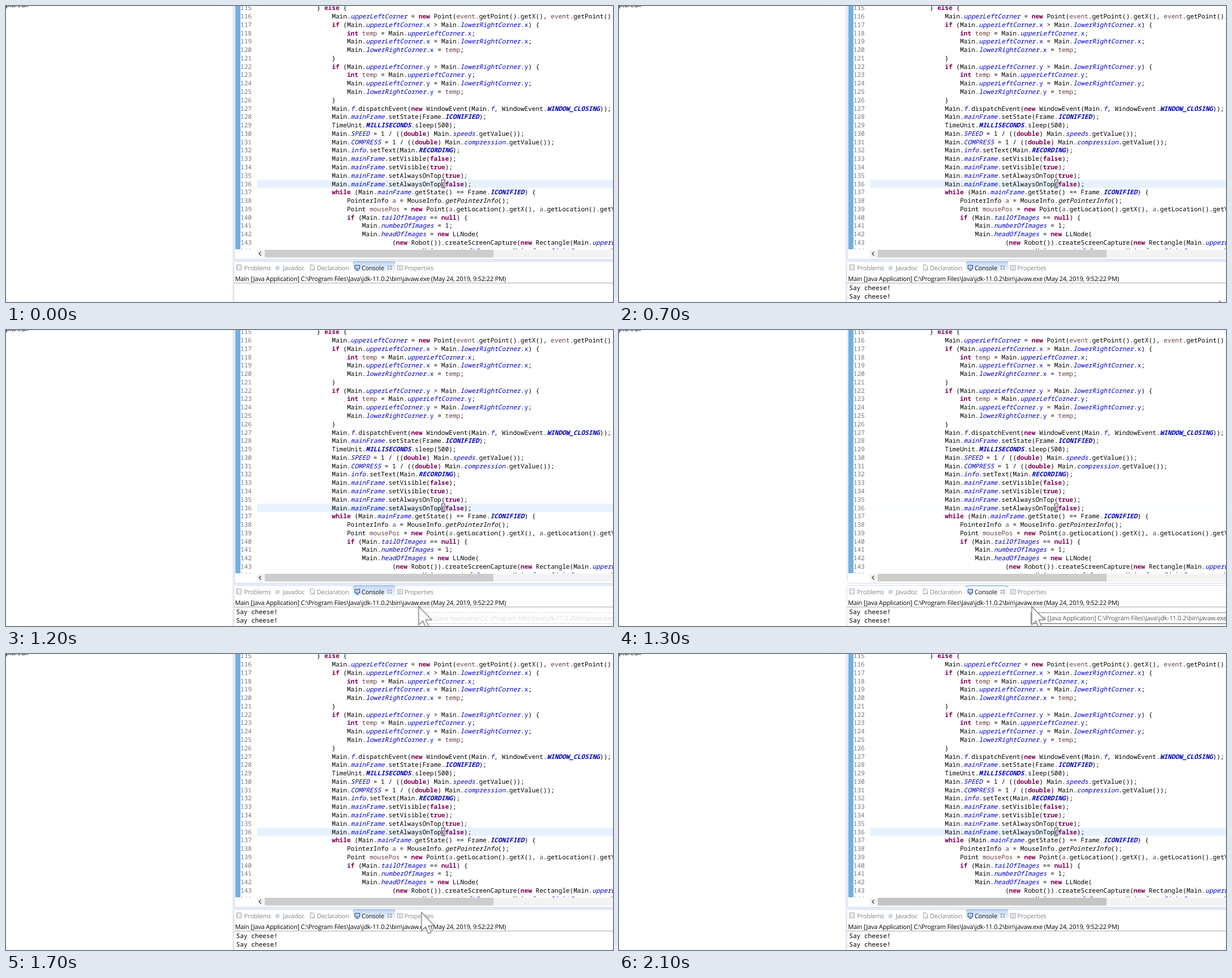
Animation, 1072 px wide and 522 px high, one loop 2.8 s. Source, as an HTML page:

```html
<!DOCTYPE html>
<html lang="en">
<meta charset="utf-8">
<title>Code editor and console</title>
<style>
  html, body { margin: 0; width: 100%; height: 100%; overflow: hidden; background: #fff }
  svg { display: block; text-rendering: geometricPrecision }
  text { white-space: pre }
  .mono { font: 11.117px "Noto Sans Mono", monospace }
  .ui { font: 11px "Open Sans", sans-serif; letter-spacing: -.18px }
  .num { fill: #787878 }
  .key { fill: #7f0055; font-weight: bold }
  .const { fill: #0000c0; font-weight: bold; font-style: italic }
  .static { fill: #0000c0; font-style: italic }
  .field { fill: #0000c0 }
  .local { fill: #6a3e3e }
  .call { font-style: italic }
  .tab { fill: #858585 }
</style>
<svg width="1072" height="522" viewBox="0 0 1072 522">
  <defs>
    <pattern id="hatch" width="2" height="2" patternUnits="userSpaceOnUse">
      <path fill="#a9cff0" d="M0 0h2v2H0z"/><path fill="#3d8fd6" d="M0 0h1v1H0zM1 1h1v1H1z"/>
    </pattern>
    <linearGradient id="tabFill" x2="0" y2="1">
      <stop stop-color="#c3d8f6"/><stop offset="1" stop-color="#fafcff"/>
    </linearGradient>
  </defs>
  <text class="ui" x="-1" y="1.5">ptureGif</text>

  <g id="tint">
    <path fill="#e6ebf8" d="M400 0h4v446H400zM400 446h672v4H400zM400 450h2v72h-2z"/>
    <path fill="#e8f2fe" d="M443 306.5h629V321H443z"/>
    <path fill="url(#tabFill)" d="M610 470q4-2 3-12 0-7 6-7h62q6 0 6 8 0 9 4 11z"/>
  </g>
  <path fill="#fff" d="M404 429h668v17H409q-5 0-5-5z"/>
  <path fill="none" stroke="#d3dcf0" d="M403.5 0v441q0 5.500 5.500 5.500h663M402.500 522v-66q0-5.500 5.500-5.500h664"/>
  <path fill="none" stroke="#a9c4ec" stroke-width="2" d="M613 454q1-3 5-3h64q4 0 5 3"/>
  <path fill="url(#hatch)" d="M405 0h9v429h-9z"/>
  <svg id="code" class="mono" width="1072" height="429"></svg>
  <path fill="none" stroke="#4a3040" d="M769.500 306.500h5.500v14h-5.500z"/>

  <path fill="#f3f3f3" d="M443 430h629v13.500H443z"/>
  <path id="thumb" d="M457 430h404v13.500H457z"/>
  <path fill="none" stroke="#505050" stroke-width="1.500" d="M450.500 433.500l-3.500 3.300 3.500 3.300"/>

  <g fill="#fff" stroke="#9aa3b0">
    <path d="M407.500 456.500h8v9h-8zM537.500 456.500h5l2 2v7h-7zM691.500 457.500h9v8h-9z"/>
    <path stroke="#b9c4d6" d="M411 459.500h4M411 462.500h4M539 459.500h3M693 460.500h6M693 463h6M695.500 458v7"/>
    <path stroke="#cf8a80" d="M408 459.500h2M408 463h2"/>
    <path stroke="#c9a860" d="M541 465l5-2"/>
    <path stroke="#2d5f9e" stroke-width="1.500" d="M616.500 457.500h8v6h-8zM618 466h5"/>
    <path stroke="#4a78b0" d="M618.500 460.500h4"/>
    <path stroke="#777" d="M674.500 458.500h1.500l1.500 1.500 1.500-1.500h1.500v1.500l-1.500 1.500 1.500 1.500v1.500h-1.500l-1.500-1.500-1.500 1.500h-1.500V463l1.500-1.500-1.500-1.500z"/>
  </g>
  <text class="ui" x="475.500" y="465" font-weight="bold" style="font-size:9px" fill="#6b92c4">@</text>
  <g class="ui tab">
    <text x="420.500" y="466">Problems</text>
    <text x="489" y="466">Javadoc</text>
    <text x="549" y="466">Declaration</text>
    <text x="628" y="466" fill="#111">Console</text>
    <text x="703.500" y="466">Properties</text>
  </g>
  <text class="ui" x="404.500" y="485">Main [Java Application] C:\Program Files\Java\jdk-11.0.2\bin\javaw.exe (May 24, 2019, 9:52:22 PM)</text>
  <path stroke="#a8a8a8" d="M403 488.500h669"/>
  <g class="mono">
    <text id="say1" x="406.500" y="501">Say cheese!</text>
    <text id="say2" x="406.500" y="516">Say cheese!</text>
  </g>

  <g id="tip">
    <path fill="#fff" stroke="#808080" d="M727.500 498.500h360v19h-360z"/>
    <path stroke="#c8c8c8" d="M729 518.500h343"/>
    <text class="ui" x="729" y="512" fill="#575757">Main [Java Application] C:\Program Files\Java\jdk-11.0.2\bin\javaw.exe</text>
  </g>
  <path id="cursor" fill="#fff" stroke="#858585" stroke-width="1.400" d="M.5 0v32.500l7.300-7 5 12 5-2.200-5-11.500h10.500z"/>
</svg>
<script>
const $ = id => document.getElementById(id);
const CELL = 6.67, PITCH = 14.78, FIRST = 115;

const source = `\
} else {
    Main.upperLeftCorner = new Point(event.getPoint().getX(), event.getPoint().getY());
    if (Main.upperLeftCorner.x > Main.lowerRightCorner.x) {
        int temp = Main.upperLeftCorner.x;
        Main.upperLeftCorner.x = Main.lowerRightCorner.x;
        Main.lowerRightCorner.x = temp;
    }
    if (Main.upperLeftCorner.y > Main.lowerRightCorner.y) {
        int temp = Main.upperLeftCorner.y;
        Main.upperLeftCorner.y = Main.lowerRightCorner.y;
        Main.lowerRightCorner.y = temp;
    }
    Main.f.dispatchEvent(new WindowEvent(Main.f, WindowEvent.WINDOW_CLOSING));
    Main.mainFrame.setState(Frame.ICONIFIED);
    TimeUnit.MILLISECONDS.sleep(500);
    Main.SPEED = 1 / ((double) Main.speeds.getValue());
    Main.COMPRESS = 1 / ((double) Main.compression.getValue());
    Main.info.setText(Main.RECORDING);
    Main.mainFrame.setVisible(false);
    Main.mainFrame.setVisible(true);
    Main.mainFrame.setAlwaysOnTop(true);
    Main.mainFrame.setAlwaysOnTop(false);
    while (Main.mainFrame.getState() == Frame.ICONIFIED) {
        PointerInfo a = MouseInfo.getPointerInfo();
        Point mousePos = new Point(a.getLocation().getX(), a.getLocation().getY());
        if (Main.tailOfImages == null) {
            Main.numberOfImages = 1;
            Main.headOfImages = new LLNode(
                    (new Robot()).createScreenCapture(new Rectangle(Main.upperLeftCorner.x,
                            Main.upperLeftCorner.y, Main.lowerRightCorner.x - Main.upperLeftCorner.x,`;

const syntax = new RegExp([
  String.raw`(?<key>\b(?:else|new|if|int|double|true|false|null|while)\b)`,
  String.raw`(?<const>\b(?:WINDOW_CLOSING|ICONIFIED|MILLISECONDS|RECORDING)\b)`,
  String.raw`(?<static>(?<=Main\.)\w+)`,
  String.raw`(?<field>(?<=Corner\.)[xy]\b)`,
  String.raw`(?<local>\b(?:temp|event|a|mousePos)\b)`,
  String.raw`(?<call>\bgetPointerInfo\b)`].join('|'), 'g');

function paint(line) {
  return line.replace(/>/g, '\u0001').replace(syntax, (word, ...rest) => {
    const groups = rest.at(-1);
    const kind = Object.keys(groups).find(k => groups[k]);
    return `<tspan class="${kind}">${word}</tspan>`;
  }).replace(/\u0001/g, '&gt;');
}

$('code').innerHTML = source.split('\n').map((line, i) => {
  const y = 7.2 + i * PITCH, indent = line.search(/\S/);
  return `<text class="num" x="414" y="${y}">${FIRST + i}</text>` +
    `<text x="${548.8 + indent * CELL}" y="${y}">${paint(line.trim())}</text>`;
}).join('');

// Pointer stops: [tick, x, y], one tick is 100 ms
const stops = [[7, 1060, 520], [8, 820, 496], [9, 728.5, 487.5], [13, 728.5, 487.5],
  [14, 730.5, 484], [18, 734, 446], [19, 752, 370], [20, 800, 200]];

function pointerAt(tick) {
  const next = stops.findIndex(s => s[0] >= tick);
  if (next < 0 || tick < stops[0][0]) return null;
  const b = stops[next], a = stops[next - 1] || b;
  const k = a === b ? 0 : (tick - a[0]) / (b[0] - a[0]);
  return [a[1] + (b[1] - a[1]) * k, a[2] + (b[2] - a[2]) * k];
}

const tipFade = { 12: .2, 13: 1, 14: 1, 15: .5 };
const thumbTone = { 18: '#a6a6a6', 19: '#b0b0b0', 20: '#bababa' };

function draw(now) {
  const tick = Math.floor(now % 2800 / 100);
  $('say1').setAttribute('opacity', +(tick >= 1));
  $('say2').setAttribute('opacity', +(tick >= 2));
  $('tip').setAttribute('opacity', tipFade[tick] || 0);
  $('tint').setAttribute('opacity', tick === 13 ? .12 : 1);
  $('thumb').setAttribute('fill', thumbTone[tick] || (tick > 20 ? '#c4c4c4' : '#cdcdcd'));
  const at = pointerAt(tick);
  $('cursor').setAttribute('opacity', at ? 1 : 0);
  if (at) $('cursor').setAttribute('transform', `translate(${at})`);
}

const start = performance.now();
function loop() {
  draw(performance.now() - start);
  requestAnimationFrame(loop);
}
loop();
</script>
</html>
```
